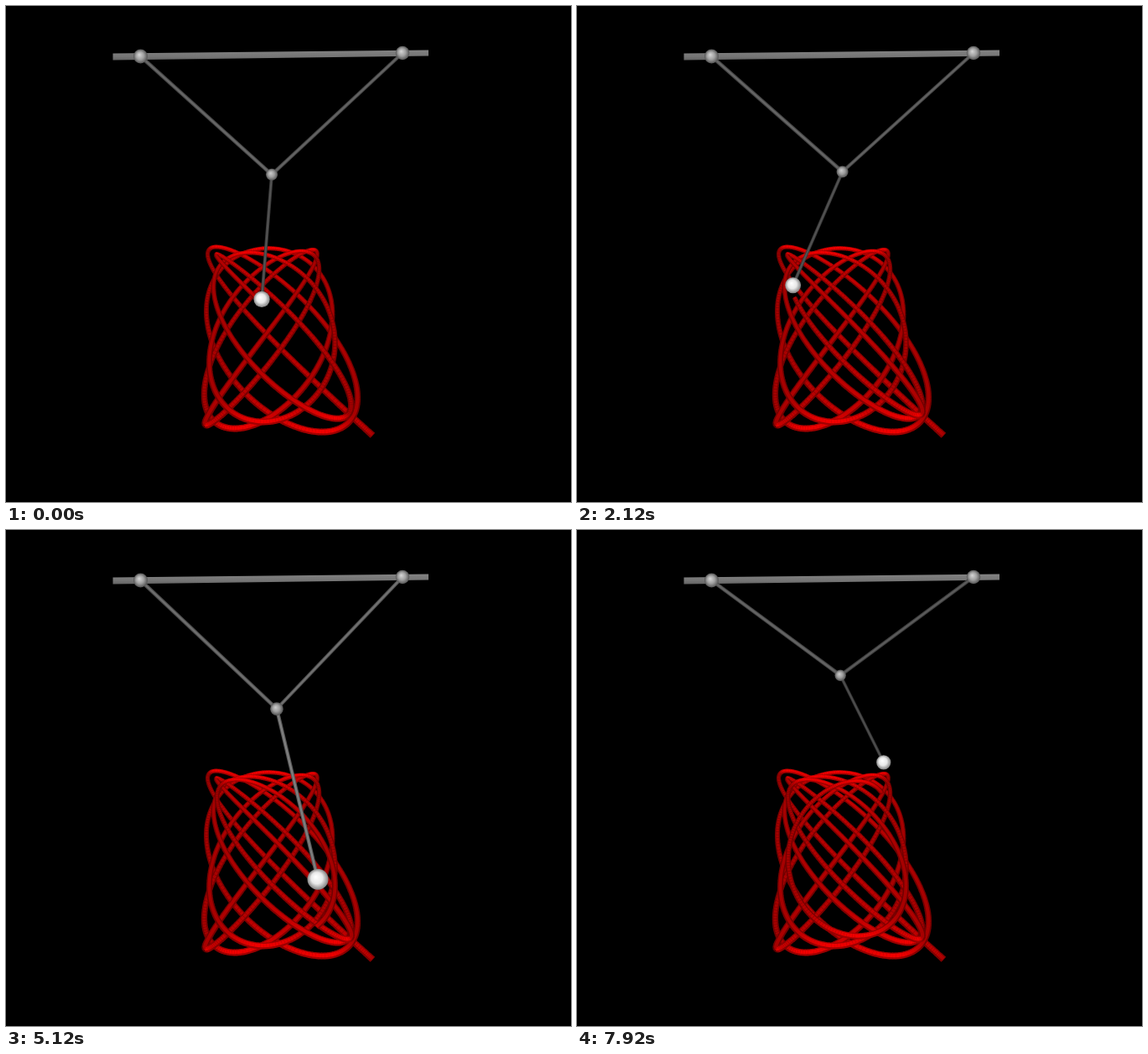
These frames come from a looping animation (674 by 591 pixels, 8 s). An HTML page with a canvas:

```html
<!DOCTYPE html>
<html lang="en">
<head>
<meta charset="utf-8">
<title>Y-suspended pendulum</title>
<style>
  html, body { margin: 0; width: 100%; height: 100%; overflow: hidden; background: #000; }
  canvas { display: block; }
</style>
</head>
<body>
<canvas id="stage" width="674" height="591"></canvas>
<script>
const ctx = document.getElementById('stage').getContext('2d');
const LOOP = 8000, RAD = Math.PI / 180, STEP = 2, START = 2160;
const RATIO = 1.177; // sideways swings per swing towards the viewer
const LEFT = { x: 160.5, y: 60 }, RIGHT = { x: 473, y: 56 };

// Swing phase in degrees (0 = nearest point) against time in ms.
const KEYS = [[0, -102.5], [750, -36], [2120, 107.5], [3320, 215],
              [5120, 335.5], [6210, 450], [7920, 578], [8300, 606]];

const rate = i => (KEYS[i + 1][1] - KEYS[i][1]) / (KEYS[i + 1][0] - KEYS[i][0]);

function slope(i) {
  if (i === 0) return rate(0);
  if (i === KEYS.length - 1) return rate(i - 1);
  return (rate(i - 1) + rate(i)) / 2;
}

function phaseAt(t) {
  let i = 0;
  while (i < KEYS.length - 2 && t >= KEYS[i + 1][0]) i++;
  const [t0, a] = KEYS[i], [t1, b] = KEYS[i + 1];
  const h = t1 - t0, u = (t - t0) / h, v = 1 - u;
  return START + (1 + 2 * u) * v * v * a + u * u * (3 - 2 * u) * b
    + h * u * v * (v * slope(i) - u * slope(i + 1));
}

// Damped Lissajous figure on the floor, seen in perspective.
function floorAt(phase) {
  const n = phase / 360;
  const X = (1 - 0.0285 * n) * Math.cos(phase * RATIO * RAD);
  const Y = (1.005 - 0.0235 * n) * Math.cos(phase * RAD);
  const s = 1 / (1 - 0.22 * Y);
  return { X, Y, s, x: 262 + 55 * s + 81.6 * X * s, y: 485 * s - 111 };
}

function line(a, b, width, color) {
  ctx.lineWidth = width;
  ctx.strokeStyle = color;
  ctx.beginPath();
  ctx.moveTo(a.x, a.y);
  ctx.lineTo(b.x, b.y);
  ctx.stroke();
}

const red = v => `rgb(${Math.round(v)},0,0)`;
const grey = v => `rgb(${Math.round(v)},${Math.round(v)},${Math.round(v)})`;

function tube(a, b) {
  const dx = b.x - a.x, dy = b.y - a.y, len = Math.hypot(dx, dy);
  if (len < 0.01) return;
  const ux = dx / len, uy = dy / len;
  const end = { x: b.x + ux * 0.6, y: b.y + uy * 0.6 };
  const w = 6.1 * Math.pow(b.s, 1.1), tone = 167 + 75 * ux ** 4;
  line(a, end, w, red(tone * 0.68));
  ctx.save();
  ctx.translate(0, -0.5);
  line(a, end, w * 0.55, red(tone));
  ctx.restore();
}

function trail(phase) {
  let prev = floorAt(0);
  for (let p = STEP; p < phase; p += STEP) {
    const next = floorAt(p);
    tube(prev, next);
    prev = next;
  }
  tube(prev, floorAt(phase));
}

function ball(p, r, light, mid, dark) {
  const g = ctx.createRadialGradient(p.x - r * 0.2, p.y - r * 0.25, 0, p.x, p.y, r);
  g.addColorStop(0, grey(light));
  g.addColorStop(0.55, grey(mid));
  g.addColorStop(1, grey(dark));
  ctx.fillStyle = g;
  ctx.beginPath();
  ctx.arc(p.x, p.y, r, 0, 2 * Math.PI);
  ctx.fill();
}

function rod(a, b, width, tone) {
  line(a, b, width, grey(tone * 0.7));
  line(a, b, width * 0.5, grey(tone));
}

function bar() {
  const g = ctx.createLinearGradient(0, 54, 0, 65);
  g.addColorStop(0, '#808080');
  g.addColorStop(0.6, '#747474');
  g.addColorStop(1, '#606060');
  ctx.fillStyle = g;
  ctx.beginPath();
  ctx.moveTo(127.5, 56.5);
  ctx.lineTo(504, 52.5);
  ctx.lineTo(504, 59.5);
  ctx.lineTo(127.5, 64.5);
  ctx.fill();
}

function draw(t) {
  ctx.fillStyle = '#000';
  ctx.fillRect(0, 0, 674, 591);
  const phase = phaseAt(t), f = floorAt(phase), { X, Y, s } = f;
  const bob = { x: f.x + 3 * X, y: f.y - (3 + 69 * Y * Y + 17 * X * X) * s };
  const joint = { x: 318.2 + 6.2 * Y, y: 208 + 32 * Y - 33 * Y * Y };

  trail(phase);
  bar();
  rod(LEFT, joint, 4.6, 104 + 8 * Y);
  rod(RIGHT, joint, 4.2, 102 + 16 * Y);
  rod(joint, bob, 4 + 0.5 * Y, 86 + 14 * Y + 40 * Math.max(0, Y));
  ball(LEFT, 8.5, 215, 160, 82);
  ball(RIGHT, 8.3, 215, 160, 82);
  ball(joint, 7.2 + 0.8 * Y, 205, 155, 82);
  ball(bob, 10.1 * Math.pow(s, 1.15), 255, 232, 130);
}

function tick() {
  draw(performance.now() % LOOP);
  requestAnimationFrame(tick);
}
tick();
</script>
</body>
</html>
```
